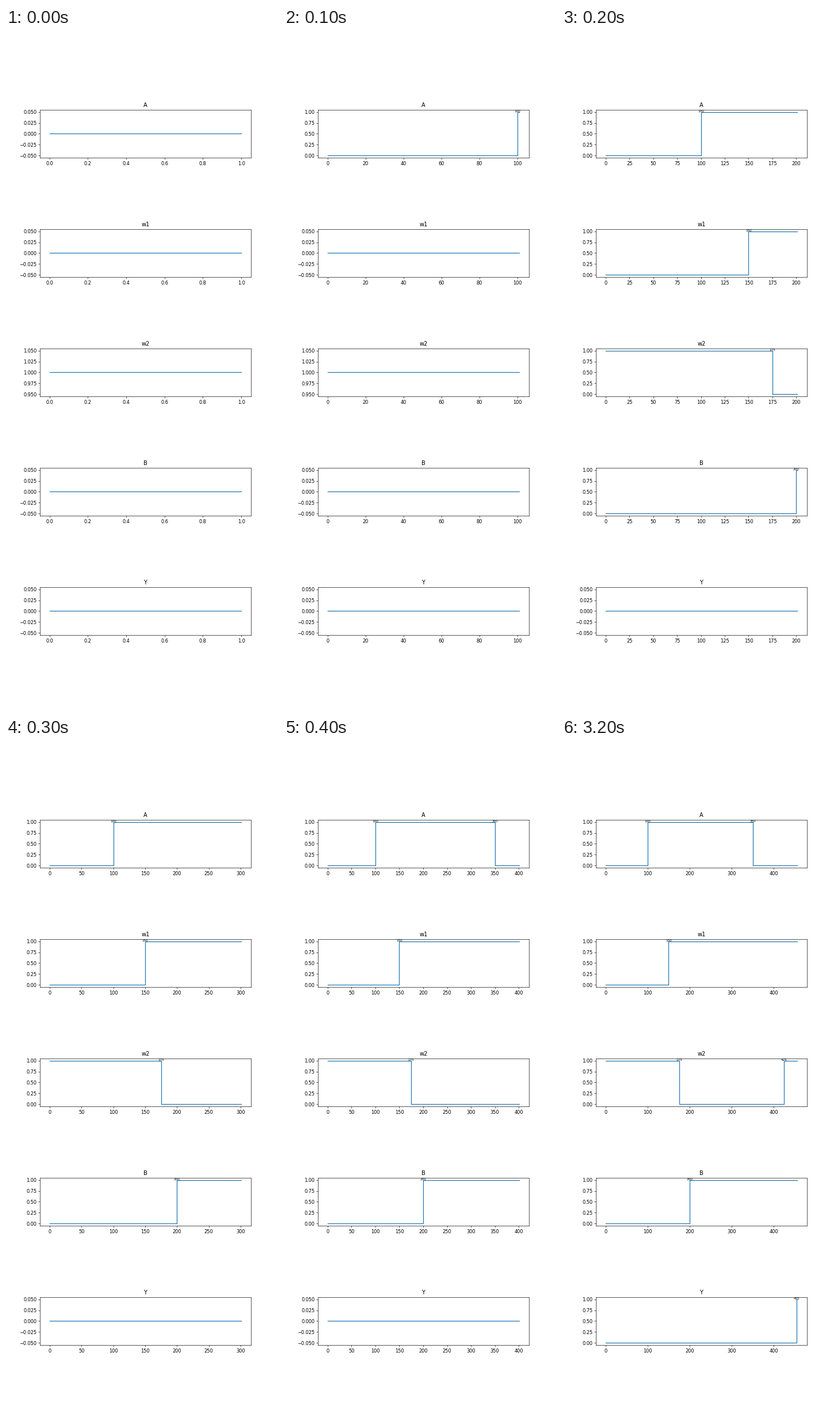
A matplotlib script for the animation above (5 s loop, 473 by 1183 pixels).

```python
import matplotlib.pyplot as plt
import numpy as np
from matplotlib.animation import FuncAnimation

WIDTH, HEIGHT, DPI = 473, 1183, 59.125
STEP_TIME, END_TIME = 100, 455
INTERVAL, FRAMES = 100, 50

# name: (initial level, times at which the level toggles)
SIGNALS = {
    "A": (0, [100, 350]),
    "w1": (0, [150]),
    "w2": (1, [175, 425]),
    "B": (0, [200]),
    "Y": (0, [455]),
}

plt.rcParams["font.family"] = "DejaVu Sans"


def padded(low, high, margin=0.05):
    """Axis limits with a margin; a flat signal gets a small range around it."""
    if low == high:
        low, high = low - 0.05, high + 0.05
    pad = margin * (high - low)
    return low - pad, high + pad


class Trace:
    def __init__(self, ax, name, initial, toggles):
        self.ax, self.initial, self.toggles = ax, initial, toggles
        ax.set_title(name)
        self.line, = ax.plot([], [], color="#1f77b4", drawstyle="steps-post")
        self.labels = [ax.text(t, 1, str(t), fontsize=7, ha="center")
                       for t in toggles]

    def show(self, now):
        past = [t for t in self.toggles if t <= now]
        times = [0, *past, now + 1]
        levels = (self.initial + np.arange(len(past) + 1)) % 2
        levels = np.append(levels, levels[-1])
        self.line.set_data(times, levels)
        self.ax.set_xlim(*padded(0, now + 1))
        self.ax.set_ylim(*padded(levels.min(), levels.max()))
        for t, label in zip(self.toggles, self.labels):
            label.set_visible(t <= now)


fig, axes = plt.subplots(len(SIGNALS), 1, dpi=DPI,
                         figsize=(WIDTH / DPI, HEIGHT / DPI))
fig.subplots_adjust(left=0.125, right=0.9, bottom=0.11, top=0.88, hspace=1.5)
traces = [Trace(ax, name, *spec)
          for ax, (name, spec) in zip(axes, SIGNALS.items())]


def update(frame):
    now = min(frame * STEP_TIME, END_TIME)
    for trace in traces:
        trace.show(now)


anim = FuncAnimation(fig, update, frames=FRAMES, interval=INTERVAL,
                     init_func=lambda: update(0), repeat=True,
                     repeat_delay=0, cache_frame_data=False)
plt.show()
```
